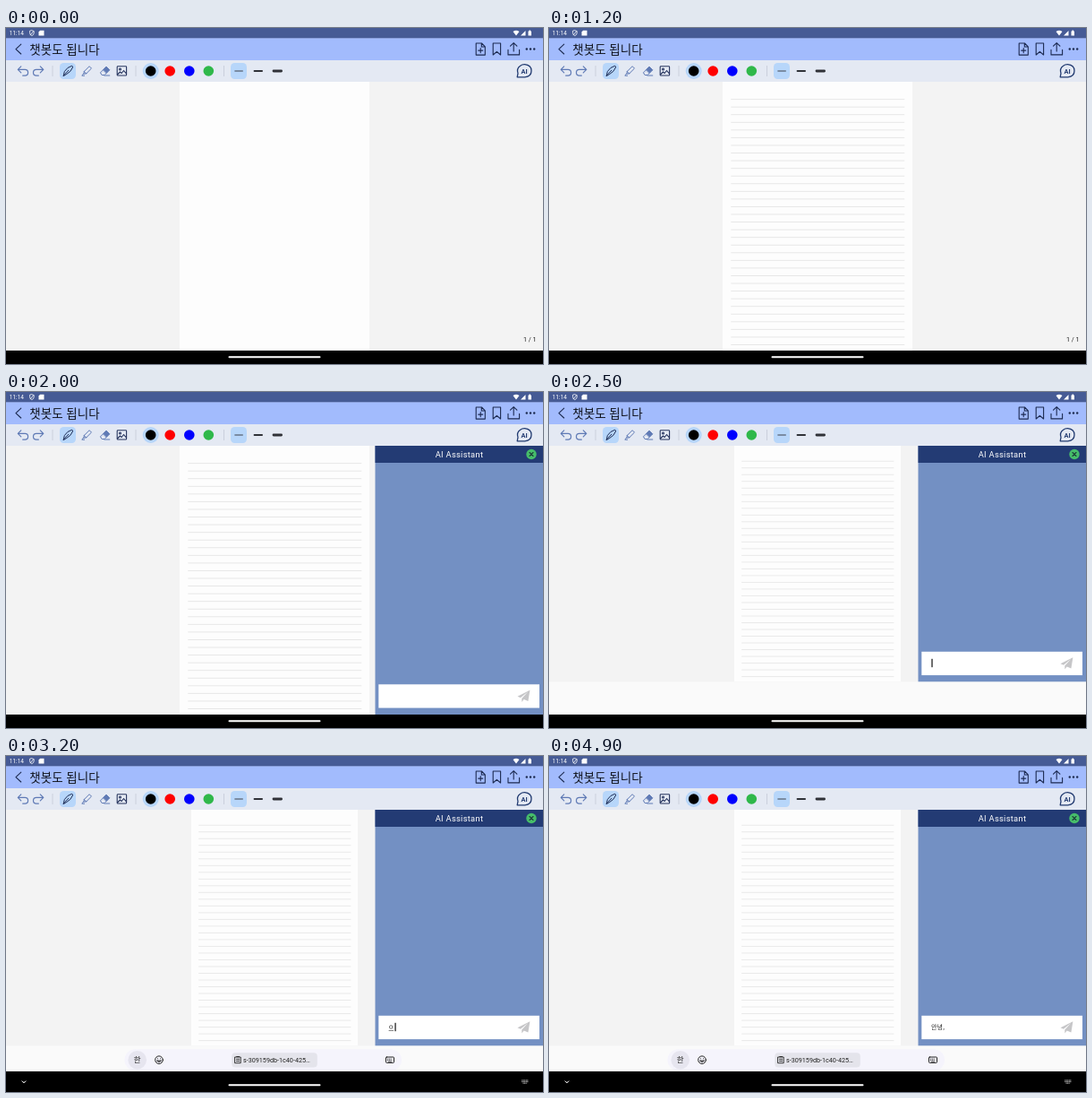
An HTML page for the animation above (5 s loop, 600 by 375 pixels).

```html
<!DOCTYPE html>
<html lang="ko">
<head>
<meta charset="utf-8">
<title>Note app</title>
<style>
html, body { margin: 0; width: 100%; height: 100%; overflow: hidden; background: #000; }
svg { display: block; width: 100vw; height: 100vh; font-family: Roboto, "Noto Sans CJK KR", "Noto Sans CJK", sans-serif; }
.ko { font-family: "Noto Sans CJK KR", "Noto Sans CJK", sans-serif; }
.line { fill: none; stroke-linecap: round; stroke-linejoin: round; }
</style>
</head>
<body>
<svg viewBox="0 0 600 375">
  <rect y="60" width="600" height="300" fill="#f3f3f3"/>
  <g id="page">
    <rect x="194" y="60" width="212" height="300" fill="#fdfdfd"/>
    <path id="rules" stroke="#e7e7e7" stroke-width="1"/>
  </g>
  <text x="578" y="350.3" font-size="7.2" fill="#222">1 / 1</text>

  <!-- status bar -->
  <rect width="600" height="11.5" fill="#465b95"/>
  <g fill="#fff">
    <text x="3.8" y="8.2" font-size="6.5">11:14</text>
    <path d="M38 2.8h4.5v5.6h-6V4.4z"/>
    <path d="M566.5 4q3.5-2.6 7 0l-3.5 4.5zM575 8.5h5.5V3zM583.5 3.4h1v-.8h1.5v.8h1v5.2h-3.5z"/>
    <path class="line" stroke="#fff" stroke-width=".8" d="M28.9 2.7l2.3.9v2q0 2-2.3 3-2.3-1-2.3-3v-2zM27.2 7.8l3.4-4"/>
  </g>

  <!-- title bar -->
  <rect y="11.2" width="600" height="25" fill="#a2bbfd"/>
  <text class="ko" x="26.3" y="28.8" font-size="13.5" fill="#10131c">챗봇도 됩니다</text>
  <g class="line" stroke="#1c2a50" stroke-width="1.1">
    <path d="M16.8 18.2l-5.8 5.4 5.8 5.4"/>
    <path d="M525.2 17h6.3l3.8 3.8v9.3h-10.1zM531.3 17v4h4M530.2 22.6v5M527.7 25.1h5"/>
    <path d="M544.2 17h8.4v13l-4.2-3.6-4.2 3.6z"/>
    <path d="M567.2 26v-9.3M563.5 20.2l3.7-3.6 3.7 3.6M561 24.3v5.6h12.6v-5.6"/>
  </g>
  <g fill="#1c2a50"><circle cx="581.8" cy="23.5" r="1.2"/><circle cx="586" cy="23.5" r="1.2"/><circle cx="590.2" cy="23.5" r="1.2"/></g>

  <!-- toolbar -->
  <rect y="36" width="600" height="24" fill="#e4e9f3"/>
  <path stroke="#c5cad6" stroke-width=".8" d="M52 42v12M145 42v12M243.5 42v12"/>
  <g fill="#b7d6fa">
    <rect x="60" y="39" width="18" height="18" rx="4.5"/>
    <rect x="251" y="39" width="18" height="18" rx="4.5"/>
    <circle cx="161.7" cy="48" r="9"/>
  </g>
  <g class="line" stroke="#5f7ab5" stroke-width="1.2">
    <path id="undo" d="M16.8 42.8l-3.5 3.5 3.5 3.5M13.5 46.3h7.7a3.4 3.4 0 0 1 0 6.8h-2.5"/>
    <path d="M38.3 42.8l3.5 3.5-3.5 3.5M41.6 46.3h-7.7a3.4 3.4 0 0 0 0 6.8h2.5"/>
  </g>
  <path class="line" stroke="#1d2c55" stroke-width="1" d="M64.3 53.2l1-4.6q3-5 8.4-6.4 1 .7.8 1.8-2 5-6.3 7.2zM64.3 53.2l5.6-6"/>
  <g class="line" stroke="#5f7ab5" stroke-width="1">
    <path d="M87.5 48.3l5.6-5.6 2.4 2.4-5.6 5.6zM87.5 48.3l-.8 3 3.2-.6M86.4 51.2l-1.6 2h2.8"/>
    <path d="M105.7 49.6l6.3-6.3 3.6 3.5-5.5 5.7h-2.6zM109.8 53h6"/>
    <path fill="#5f7ab5" d="M108.8 46.5l3.2-3.2 3.6 3.5-3.3 3.3z"/>
  </g>
  <g class="line" stroke="#26345e" stroke-width="1.1">
    <rect x="124.2" y="42.8" width="10.4" height="10.2" rx=".8"/>
    <circle cx="127.5" cy="46" r="1"/>
    <path d="M124.5 52l3-3 1.7 1.5 2.3-3 2.9 3.4"/>
  </g>
  <circle cx="161.7" cy="48" r="5.8"/>
  <circle cx="183.2" cy="48" r="5.8" fill="#f00"/>
  <circle cx="204.8" cy="48" r="5.8" fill="#00f"/>
  <circle cx="226.3" cy="48" r="5.8" fill="#2fb84a"/>
  <g class="line" stroke="#303238">
    <path stroke-width=".9" d="M255.8 48h8.6"/>
    <path stroke-width="1.8" d="M277.5 48h8.6"/>
    <path stroke-width="2.8" d="M299 48h8.6"/>
  </g>
  <ellipse id="press" cx="579" cy="48" rx="10" ry="10" fill="#c6cad3"/>
  <path class="line" stroke="#213a70" stroke-width="1.3" d="M571.2 54.8l.8-4.2q-1.8-5.4 2.6-8.4 2-1.6 5-1.5 7.3.7 7.4 7 0 6.5-7.3 7.1z"/>
  <text x="579.1" y="50.6" font-size="7.4" font-weight="bold" text-anchor="middle" fill="#213a70">AI</text>

  <!-- assistant -->
  <g id="panel">
    <rect x="412.5" y="60" width="187.5" height="300" fill="#7390c3"/>
    <rect x="412.5" y="60" width="187.5" height="19" fill="#233b74"/>
    <text x="506.5" y="73.3" font-size="9.3" letter-spacing=".3" text-anchor="middle" fill="#fff">AI Assistant</text>
    <circle cx="587" cy="69.5" r="5.7" fill="#46bd6a"/>
    <path class="line" stroke="#1c3d3a" stroke-width="1.1" d="M585 67.5l4 4M589 67.5l-4 4"/>
  </g>
  <rect id="strip" y="323.3" width="600" height="36.7" fill="#fafafa"/>
  <g id="box">
    <rect x="416.3" y="326.3" width="179.7" height="26.3" fill="#fff"/>
    <path fill="#c6c6c8" d="M585.4 332.8l-2 12.2-4.7-2-2.4 3v-4l7-7.4-8.4 6.7-3.4-1.5z"/>
    <text id="typed" class="ko" x="427" y="341.6" font-size="7" fill="#222"></text>
    <rect id="under" x="427.6" y="342.5" height=".6" fill="#333"/>
    <rect id="caret" y="334.3" width="1.2" height="9.4" fill="#111"/>
  </g>

  <!-- keyboard tray -->
  <g id="tray">
    <rect y="352" width="600" height="23"/>
    <rect x="132.5" y="327.2" width="309.5" height="24" rx="12" fill="#f5f4fc"/>
    <circle cx="146.7" cy="339.2" r="10.3" fill="#e6e5ef"/>
    <text class="ko" x="146.7" y="342.2" font-size="8.5" text-anchor="middle" fill="#222">한</text>
    <g class="line" stroke="#222" stroke-width="1">
      <circle cx="171" cy="339.2" r="4.3"/>
      <path d="M168.8 340.4q2.2 2.6 4.4 0zM169.4 337.8h.1M172.5 337.8h.1"/>
    </g>
    <rect x="252.3" y="331.2" width="95.5" height="16.4" rx="4" fill="#e4e4eb"/>
    <path class="line" stroke="#222" stroke-width=".9" d="M256 336h6.2v6.7H256zM257.7 335.5h2.8M257.5 338.3h3.2M257.5 340.4h3.2"/>
    <text x="265" y="341.8" font-size="7.2" fill="#222">s-309159db-1c40-425…</text>
    <g id="keys">
      <rect class="line" x="424.5" y="336" width="9" height="6.4" rx=".8" stroke="#222" stroke-width="1"/>
      <path class="line" stroke="#222" stroke-width=".9" stroke-dasharray=".3 1.5" d="M426.4 338.1h5.4M426.4 339.7h5.4"/>
      <path stroke="#222" stroke-width=".8" d="M427 341.2h4"/>
    </g>
    <path class="line" stroke="#ddd" stroke-width="1" d="M18.2 363l1.8 1.8 1.8-1.8"/>
    <path stroke="#999" stroke-width="1" stroke-dasharray="1 .5" d="M576.3 362h7.2M576.3 363.6h7.2"/>
    <path stroke="#999" stroke-width="1" d="M577.6 365.2h4.6"/>
  </g>
  <rect y="360" width="600" height="15"/>
  <use href="#navMarks"/>
  <g id="navMarks">
    <path class="line" id="hide" stroke="#ddd" stroke-width="1" d="M18.2 363l1.8 1.8 1.8-1.8"/>
    <path id="swap" stroke="#999" stroke-width=".9" stroke-dasharray="1 .5" d="M576.3 362h7.2M576.3 363.6h7.2M577.6 365.2h4.6"/>
  </g>
  <rect x="248.5" y="366.2" width="103" height="2" rx="1" fill="#fff"/>
</svg>
<script>
const $ = id => document.getElementById(id);
const show = (id, on) => $(id).style.display = on ? '' : 'none';

const LOOP = 5000, LINED = 100, OPEN = 1300, RELEASE = 1500, FOCUS = 2500, TRAY = 2600;
const typing = [[3200, 'ㅇ'], [3300, '아'], [3500, '안'], [3600, '안ㄴ'],
  [3800, '안녀'], [3900, '안녕'], [4200, '안녕,']];

let d = '';
for (let i = 0; i < 33; i++) d += `M203.3 ${79.6 + i * 8.56}H397.3`;
$('rules').setAttribute('d', d);

function draw() {
  const t = performance.now() % LOOP;
  const focused = t >= FOCUS, tray = t >= TRAY;
  show('rules', t >= LINED);
  show('panel', t >= OPEN);
  show('box', t >= OPEN);
  show('press', t >= OPEN && t < RELEASE);
  show('strip', focused);
  show('tray', tray);
  show('navMarks', tray);

  // The page shrinks to the space left above the keyboard.
  $('page').setAttribute('transform', focused ? 'translate(300 60) scale(.8777) translate(-300 -60)' : '');
  $('box').setAttribute('transform', focused ? 'translate(0 -36.5)' : '');

  const [since, text] = typing.filter(k => t >= k[0]).pop() || [FOCUS, ''];
  const typed = $('typed');
  if (typed.textContent !== text) typed.textContent = text;
  const width = text && t >= OPEN ? typed.getComputedTextLength() : 0;
  $('under').setAttribute('width', text && !text.endsWith(',') ? Math.max(0, width - 1) : 0);
  $('caret').setAttribute('x', 427.4 + width + (text ? .6 : 0));
  show('caret', focused && (t - since) % 1000 < 500);
  requestAnimationFrame(draw);
}
draw();
</script>
</body>
</html>
```
